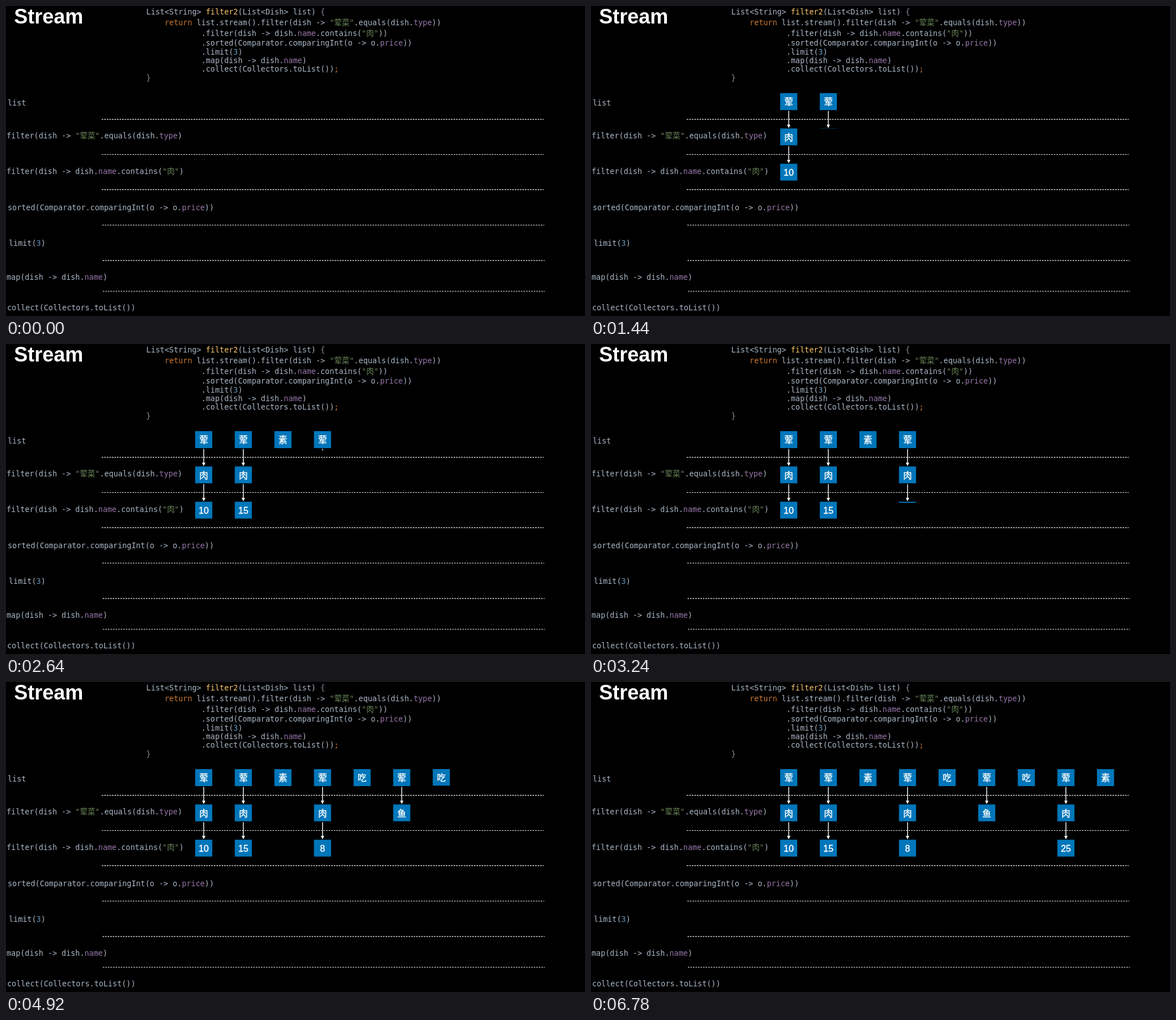
Write an HTML page with a canvas that moves like this. It is 1022x548 px and loops after 6.84 s.

```html
<!DOCTYPE html>
<html lang="zh-CN">
<head>
<meta charset="utf-8">
<title>Stream</title>
<style>
  html, body { margin: 0; width: 100%; height: 100%; overflow: hidden; background: #000; }
  canvas { display: block; width: 1022px; height: 548px; }
</style>
</head>
<body>
<canvas id="stage" width="1022" height="548"></canvas>
<script>
const ctx = document.getElementById('stage').getContext('2d');
const LOOP = 6840, STEP = 60, WIPE = 202;
const BOX = 30.2, PITCH = 69.9, ROW = 62.3, LEFT = 333.9, TOP = 154;
const CODE_FONT = '13.44px "DejaVu Sans Mono", "Noto Sans CJK SC", monospace';
const NUMBER_FONT = '16px "Liberation Sans", Arial, sans-serif';
const HANZI_FONT = '15.5px "Noto Sans CJK SC", sans-serif';

// [text, x, baseline]
const code = [
  ['List<String> filter2(List<Dish> list) {', 247.6, 15],
  ['    return list.stream().filter(dish -> "荤菜".equals(dish.type))', 247.6, 34],
  ['            .filter(dish -> dish.name.contains("肉"))', 247.6, 53],
  ['            .sorted(Comparator.comparingInt(o -> o.price))', 247.6, 70],
  ['            .limit(3)', 247.6, 85.5],
  ['            .map(dish -> dish.name)', 247.6, 101],
  ['            .collect(Collectors.toList());', 247.6, 116],
  ['}', 247.6, 131.5],
  ['list', 3, 175.5],
  ['filter(dish -> "荤菜".equals(dish.type)', 1, 234],
  ['filter(dish -> dish.name.contains("肉")', 1, 296.5],
  ['sorted(Comparator.comparingInt(o -> o.price))', 3, 360.5],
  ['limit(3)', 5, 423.5],
  ['map(dish -> dish.name)', 1, 484],
  ['collect(Collectors.toList())', 2, 538]
];

// [x, y] of each dashed divider
const dividers = [[169, 200.4], [169, 262.5], [169, 324.6], [170, 387.2], [170.5, 449.8], [171, 504.2]];

// Each column: start time and the boxes it passes through
const columns = [
  [0, '荤', '肉', '10'], [1020, '荤', '肉', '15'], [2040, '素'],
  [2398, '荤', '肉', '8'], [3420, '吃'], [3862, '荤', '鱼'],
  [4740, '吃'], [5075, '荤', '肉', '25'], [6095, '素']
];

const TOKEN = /("[^"]*"|\breturn\b|;|filter2|(?<=\.)(?:name|type|price)\b|(?<=\()\d|[{}])/;

function tokenColor(s) {
  if (s[0] === '"') return '#6a8759';
  if (s === 'return' || s === ';') return '#cc7832';
  if (s === 'filter2') return '#ffc66d';
  if (/^(name|type|price)$/.test(s)) return '#9876aa';
  if (/^\d$/.test(s)) return '#6897bb';
  if (/^[{}]$/.test(s)) return '#858c98';
  return '#a9b7c6';
}

function drawCode([text, x, y]) {
  ctx.font = CODE_FONT;
  for (const part of text.split(TOKEN)) {
    ctx.fillStyle = tokenColor(part);
    ctx.fillText(part, x, y);
    x += ctx.measureText(part).width;
  }
}

function drawBackground() {
  ctx.fillStyle = '#000';
  ctx.fillRect(0, 0, 1022, 548);
  ctx.textAlign = 'left';
  ctx.fillStyle = '#fff';
  ctx.font = 'bold 36px "Liberation Sans", Arial, sans-serif';
  ctx.fillText('Stream', 14.3, 31);
  code.forEach(drawCode);
  ctx.strokeStyle = '#fff';
  ctx.lineWidth = 1.15;
  ctx.setLineDash([2.7, 1.8]);
  for (const [x, y] of dividers) {
    ctx.beginPath();
    ctx.moveTo(x, y);
    ctx.lineTo(x + 780, y);
    ctx.stroke();
  }
  ctx.setLineDash([]);
}

function drawBox(x, y, label) {
  ctx.fillStyle = '#0076ba';
  ctx.fillRect(x, y, BOX, BOX);
  ctx.fillStyle = ctx.strokeStyle = '#fff';
  ctx.font = /\d/.test(label) ? NUMBER_FONT : HANZI_FONT;
  ctx.textAlign = 'center';
  ctx.lineWidth = 0.4;
  ctx.fillText(label, x + BOX / 2, y + 21.2);
  ctx.strokeText(label, x + BOX / 2, y + 21.2);
}

function drawArrow(x, y) {
  ctx.fillStyle = '#fff';
  ctx.fillRect(x - 0.7, y, 1.4, 26);
  ctx.beginPath();
  ctx.moveTo(x - 3, y + 24.5);
  ctx.lineTo(x + 3, y + 24.5);
  ctx.lineTo(x, y + 30.5);
  ctx.fill();
}

// Reveals a drawing from its top edge downwards
function wipe(t, x, y, h, draw) {
  if (t <= 0) return;
  const p = (1 - Math.cos(Math.PI * Math.min(t / WIPE, 1))) / 2;
  ctx.save();
  ctx.beginPath();
  ctx.rect(x - 2, y, BOX + 4, h * p);
  ctx.clip();
  draw();
  ctx.restore();
}

function drawColumn([start, ...labels], i, t) {
  const x = LEFT + i * PITCH;
  labels.forEach((label, row) => {
    const y = TOP + row * ROW, begin = t - start - row * 2 * WIPE;
    wipe(begin, x, y, BOX, () => drawBox(x, y, label));
    if (row < labels.length - 1) {
      const top = y + BOX + 1;
      wipe(begin - WIPE, x, top, 31, () => drawArrow(x + BOX / 2, top));
    }
  });
}

function frame() {
  const t = Math.floor(performance.now() % LOOP / STEP) * STEP;
  drawBackground();
  columns.forEach((col, i) => drawColumn(col, i, t));
  requestAnimationFrame(frame);
}
frame();
</script>
</body>
</html>
```
